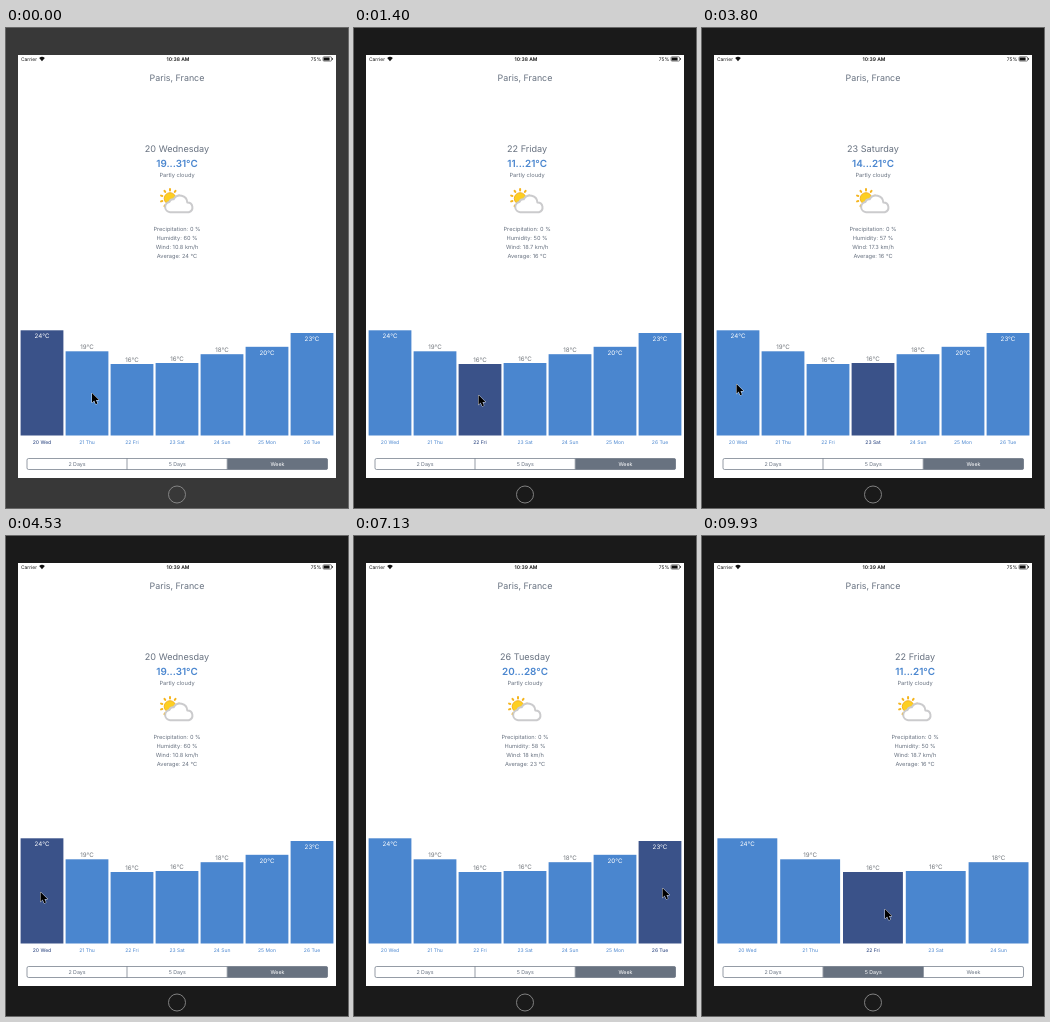
Write an HTML page that moves like this. It is 342x480 px and loops after 9.99 s.

```html
<!DOCTYPE html>
<html lang="en">
<head>
<meta charset="utf-8">
<title>Weather week</title>
<style>
  html, body { margin: 0; width: 100%; height: 100%; overflow: hidden; }
  svg { display: block; width: 342px; height: 480px; }
  text { font-family: Inter, Roboto, sans-serif; text-anchor: middle; text-rendering: geometricPrecision; }
</style>
</head>
<body>
<svg viewBox="0 0 342 480">
  <defs>
    <clipPath id="screenClip"><rect x="12" y="27" width="318" height="423"/></clipPath>
    <g id="sunCloud">
      <g id="rays" stroke="#f5b51f" stroke-width="2" stroke-linecap="round"></g>
      <circle cx="164" cy="170.5" r="5.8" fill="#fdcf22" stroke="#f2ac18" stroke-width=".9"/>
      <path d="M164 184.2a5.2 5.2 0 0 1-.6-10.3a4 4 0 0 1 4.3-2.6a7.3 7.3 0 0 1 13.6 3.1a5 5 0 0 1 1.5 9.8Z"
            fill="#fff" stroke="#cbcbcd" stroke-width="2" stroke-linejoin="round"/>
    </g>
  </defs>

  <rect id="bezel" width="342" height="480"/>
  <rect x="12" y="27" width="318" height="423" fill="#fff"/>
  <circle cx="171" cy="466.5" r="8.5" fill="none" stroke="#8c8c8c" stroke-width=".9"/>

  <g id="status"></g>
  <g clip-path="url(#screenClip)">
    <g id="oldPage"></g>
    <g id="newPage"></g>
  </g>
  <g id="chart"></g>
  <g id="segments"></g>
  <path id="cursor" d="M0 0V9.7L2.2 7.6L3.7 11.2L5.5 10.4L4 7H7Z"
        fill="#000" stroke="#fff" stroke-width=".8" stroke-linejoin="round" paint-order="stroke"/>
</svg>

<script>
const LOOP = 9990, SLIDE = 270, PAGE_WIDTH = 318, CENTER = 171, BASE = 407.5;
const BLUE = '#4a86cf', NAVY = '#3a5289', SLATE = '#687280';
const $ = id => document.getElementById(id);

const days = [
  { date: 20, name: 'Wednesday', avg: 24, top: 302.3, range: '19...31', humidity: 60, wind: 10.8 },
  { date: 21, name: 'Thursday', avg: 19, top: 323.3, range: '15...23', humidity: 55, wind: 14.4 },
  { date: 22, name: 'Friday', avg: 16, top: 336, range: '11...21', humidity: 50, wind: 18.7 },
  { date: 23, name: 'Saturday', avg: 16, top: 335, range: '14...21', humidity: 57, wind: 17.3 },
  { date: 24, name: 'Sunday', avg: 18, top: 326.2 },
  { date: 25, name: 'Monday', avg: 20, top: 318.8, inside: true },
  { date: 26, name: 'Tuesday', avg: 23, top: 305, range: '20...28', humidity: 58, wind: 18 }
];
days[0].inside = days[6].inside = true;

// start time, selected day, visible days, whether the details slide
const taps = [
  { at: 0, day: 0, count: 7 },
  { at: 70, day: 1, count: 7, slide: true },
  { at: 1145, day: 2, count: 7, slide: true },
  { at: 2290, day: 3, count: 7, slide: true },
  { at: 4180, day: 0, count: 7, slide: true },
  { at: 6860, day: 6, count: 7, slide: true },
  { at: 8450, day: 0, count: 5 },
  { at: 9725, day: 2, count: 5, slide: true }
];

// pointer moves: from time, to time, end position
const START = [86, 365];
const moves = [
  [500, 1000, 124.5, 367],
  [1900, 2270, 172, 363],
  [2950, 3330, 21, 362],
  [3630, 3800, 34.5, 356],
  [5290, 6270, 249, 355],
  [6300, 6530, 308.5, 352],
  [7760, 8400, 193, 433],
  [9110, 9470, 183, 373]
];

const ease = p => (1 - Math.cos(Math.PI * Math.min(1, Math.max(0, p)))) / 2;
const mix = (a, b, p) => a + (b - a) * p;

// y is the middle of the capitals
const label = (text, x, y, size, fill, weight = 400) =>
  `<text x="${x}" y="${y + size * .364}" font-size="${size}" fill="${fill}" font-weight="${weight}">${text}</text>`;

const rect = (x, y, w, h, fill, extra = '') =>
  `<rect x="${x}" y="${y}" width="${w}" height="${h}" fill="${fill}" ${extra}/>`;

function pageMarkup(day) {
  const details = ['Precipitation: 0 %', `Humidity: ${day.humidity} %`,
    `Wind: ${day.wind} km/h`, `Average: ${day.avg} °C`];
  return label(`${day.date} ${day.name}`, CENTER, 121, 9.1, SLATE) +
    label(`${day.range}°C`, CENTER, 135, 9.9, BLUE, 600) +
    label('Partly cloudy', CENTER, 146.6, 5.7, SLATE) +
    '<use href="#sunCloud"/>' +
    details.map((line, i) => label(line, CENTER, 201.2 + i * 9.05, 5.65, SLATE)).join('');
}

function chartMarkup(selected, count) {
  const [left, pitch, width] = count === 7 ? [14.6, 45, 42.8] : [15.4, 62.8, 59.9];
  return days.slice(0, count).map((day, i) => {
    const x = left + i * pitch, mid = x + width / 2, on = i === selected;
    return rect(x, day.top, width, BASE - day.top, on ? NAVY : BLUE) +
      label(`${day.avg}°C`, mid, day.top + (day.inside ? 5.6 : -4.7), 6.2, day.inside ? '#fff' : '#72777d') +
      label(`${day.date} ${day.name.slice(0, 3)}`, mid, 413.7, 5, on ? NAVY : BLUE, on ? 500 : 400);
  }).join('');
}

function segmentsMarkup(count) {
  const active = count === 7 ? 2 : 1;
  return rect(21 + active * 100.2, 430.5, 100.2, 11, SLATE, 'rx="1"') +
    rect(21, 430.5, 300.5, 11, 'none', `rx="1.6" stroke="${SLATE}" stroke-width=".7"`) +
    `<path d="M121 430.5v11M221.2 430.5v11" stroke="${SLATE}" stroke-width=".7"/>` +
    ['2 Days', '5 Days', 'Week'].map((name, i) =>
      label(name, 71 + i * 100.2, 436, 5.3, i === active ? '#fff' : SLATE)).join('');
}

$('rays').innerHTML = Array.from({ length: 10 }, (_, i) =>
  `<path d="M164 162.4v-1.3" transform="rotate(${i * 36} 164 170.5)"/>`).join('');

$('status').innerHTML = label('Carrier', 23, 31, 4.9, '#111') +
  '<path d="M36 33.2L33.2 30.1a4 4 0 0 1 5.6 0Z" fill="#111"/>' +
  '<g id="clock"></g>' + label('75%', 310, 31, 4.9, '#111') +
  rect(317, 28.8, 8.6, 4.3, 'none', 'rx="1" stroke="#111" stroke-width=".5"') +
  rect(317.6, 29.4, 6, 3.1, '#111', 'rx=".5"') + rect(326.2, 30.1, .8, 1.7, '#111') +
  label('Paris, France', CENTER, 49.5, 8.9, SLATE);

const shown = {};
function fill(id, key, markup) {
  if (shown[id] === key) return;
  shown[id] = key;
  $(id).innerHTML = markup();
}

function pointerAt(t) {
  let [x, y] = START;
  for (const [from, to, endX, endY] of moves) {
    if (t < from) break;
    const p = ease((t - from) / (to - from));
    x = mix(x, endX, p);
    y = mix(y, endY, p);
  }
  return `translate(${x} ${y})`;
}

function render(t) {
  const index = taps.findLastIndex(tap => tap.at <= t);
  const tap = taps[index], before = taps[Math.max(0, index - 1)];
  const progress = tap.slide ? ease((t - tap.at) / SLIDE) : 1;
  const direction = Math.sign(tap.day - before.day) || 1;
  const offset = direction * PAGE_WIDTH * (1 - progress);
  const minute = t < 3670 ? 38 : 39;

  fill('oldPage', before.day, () => pageMarkup(days[before.day]));
  fill('newPage', tap.day, () => pageMarkup(days[tap.day]));
  fill('chart', `${tap.day}/${tap.count}`, () => chartMarkup(tap.day, tap.count));
  fill('segments', tap.count, () => segmentsMarkup(tap.count));
  fill('clock', minute, () => label(`10:${minute} AM`, 172, 31, 5, '#111', 600));

  $('newPage').setAttribute('transform', `translate(${offset} 0)`);
  $('oldPage').setAttribute('transform', `translate(${offset - direction * PAGE_WIDTH} 0)`);
  $('oldPage').setAttribute('visibility', progress < 1 ? 'visible' : 'hidden');
  $('bezel').setAttribute('fill', t < 70 ? '#383838' : '#1a1a1a');
  $('cursor').setAttribute('transform', pointerAt(t));
}

const start = performance.now();
function tick() {
  render((performance.now() - start) % LOOP);
  requestAnimationFrame(tick);
}
tick();
</script>
</body>
</html>
```
